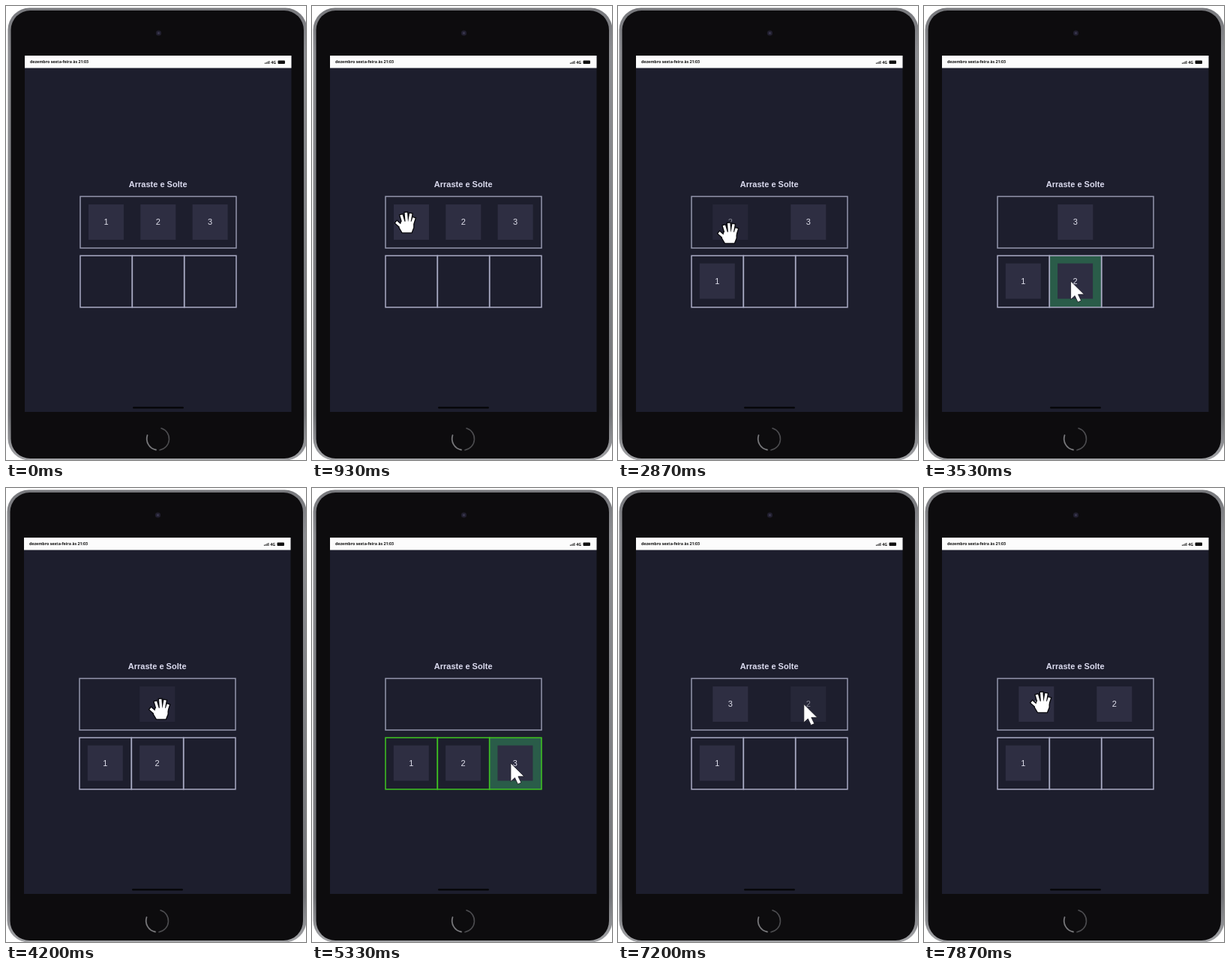
Recreate the animation shown at these times as an HTML page. Size 400 by 604 pixels, loop 8000 ms.

```html
<!DOCTYPE html>
<html lang="pt">
<head>
<meta charset="utf-8">
<title>Arraste e Solte</title>
<style>
  html, body { margin: 0; width: 100%; height: 100%; overflow: hidden; background: #fff; }
  svg { display: block; width: 400px; height: 604px; }
  text { font-family: "Liberation Sans", Arial, sans-serif; }
  .status { font: 700 5.3px "Open Sans", sans-serif; fill: #111; }
  .title { font-size: 11px; font-weight: 700; fill: #dcdcf0; text-anchor: middle; }
  .label { font-size: 11px; fill: #dedeea; text-anchor: middle; }
  .box { fill: none; stroke-width: 1.5; stroke: #9496ad; }
</style>
</head>
<body>
<svg viewBox="0 0 400 604">
  <defs>
    <linearGradient id="rim" x1="0" y1="0" x2="0" y2="1">
      <stop offset="0" stop-color="#77787c"/>
      <stop offset=".1" stop-color="#8c8d91"/>
      <stop offset=".9" stop-color="#737478"/>
      <stop offset="1" stop-color="#a2a3a6"/>
    </linearGradient>
    <g id="handShape">
      <path d="M-5-8L-2 2M1-11L2 2M7-9.5L5 2M11-4L8 5M-11 1L-3 8" fill="none" stroke-linecap="square"/>
      <path d="M-4 1H9V7L7 12H-3L-6 7Z"/>
    </g>
  </defs>
  <g id="stage">
    <rect x="1.5" y="2.5" width="399" height="602" rx="29" fill="url(#rim)"/>
    <rect x="5.5" y="6" width="390.5" height="596" rx="26" fill="#0d0c0e"/>
    <circle cx="202.5" cy="36" r="3.6" fill="#211f2e"/>
    <circle cx="202.5" cy="36" r="1.6" fill="#3a3850"/>
    <rect x="24" y="66" width="355.5" height="474" fill="#1d1e2d"/>
    <rect x="24" y="66" width="355.5" height="16.5" fill="#fcfcfc"/>
    <text class="status" x="31" y="76.4">dezembro sexta-feira às 21:03</text>
    <path d="M344.5 77v-1.5M346.3 77v-2.3M348.1 77v-3.2M349.9 77v-4" stroke="#333" stroke-width="1.1"/>
    <text class="status" x="352.3" y="76.6">4G</text>
    <rect x="361.5" y="72.5" width="9.5" height="4.4" rx="1" fill="#111"/>
    <rect x="168" y="533.3" width="68" height="2.2" rx="1.1" fill="#050507"/>
    <g fill="none" stroke-linecap="round">
      <path d="M187.5 571A15 15 0 0 0 199 590.5" stroke="#77777a" stroke-width="1.8"/>
      <path d="M206 561.7A15 15 0 0 1 204 590.8" stroke="#4c4c4f" stroke-width="1.6"/>
    </g>
    <text class="title" x="201.7" y="241.2">Arraste e Solte</text>
    <rect class="box" x="98" y="253.4" width="208" height="68.6"/>
    <g id="slots"></g>
    <g id="tiles"></g>
    <path id="arrow" d="M0 0V24.5L5.5 19.5L9.5 28L14 26L10 17.8H18Z" fill="#fff" stroke="#15151f" stroke-width=".8"/>
    <g id="hand">
      <use href="#handShape" fill="#08080c" stroke="#08080c" stroke-width="6"/>
      <use href="#handShape" fill="#fff" stroke="#fff" stroke-width="3.4"/>
    </g>
  </g>
</svg>
<script>
const LOOP = 8000, FPS = 15;
const MID = 202, WIDTH = 208, TOP = 287.5, LOW = 366;
const FADE = 130, DIM = .55;
const NONE = -1;

// The cursor goes to a tile from leave to arrive, grips it at an offset from
// its centre and drops it in a slot, or back on top; over is the lit slot.
const drags = [
  { tile: 0, slot: 0, over: 0, leave: 670, arrive: 930, grab: 1470, drop: 2000, grip: [-8, 0] },
  { tile: 1, slot: 1, over: 1, leave: 2470, arrive: 2870, grab: 2730, drop: 3400, grip: [-3, 14] },
  { tile: 2, slot: 2, over: 2, leave: 3670, arrive: 4200, grab: 4070, drop: 5000, grip: [3, 6] },
  { tile: 2, slot: NONE, over: 1, leave: 5530, arrive: 5670, grab: 5530, drop: 5930, grip: [0, 2] },
  { tile: 1, slot: NONE, over: NONE, leave: 6070, arrive: 6600, grab: 6800, drop: 7200, grip: [14, 3] },
  { tile: 2, leave: 7670, arrive: 7870, grab: LOOP, drop: LOOP, grip: [6, -3] }
];

const $ = id => document.getElementById(id);
const clamp = v => Math.min(1, Math.max(0, v));
const place = (el, x, y) => el.setAttribute("transform", `translate(${x} ${y})`);
const show = (el, on) => { el.style.display = on ? "" : "none"; };

// Centre of place i of n, spread evenly over the box.
const spread = (i, n) => MID + (i - (n - 1) / 2) * WIDTH / n;

function add(parent, tag, attrs, text) {
  const el = document.createElementNS("http://www.w3.org/2000/svg", tag);
  for (const k in attrs) el.setAttribute(k, attrs[k]);
  if (text) el.textContent = text;
  return parent.appendChild(el);
}

const slots = [0, 1, 2].map(i => {
  const size = { x: 98 + i * WIDTH / 3, y: 332.2, width: WIDTH / 3, height: 68.6 };
  return {
    fill: add($("slots"), "rect", { ...size, fill: "#2a5c49" }),
    edge: add($("slots"), "rect", { ...size, class: "box" })
  };
});

const tiles = [1, 2, 3].map(n => {
  const g = add($("tiles"), "g", {});
  add(g, "rect", { x: -23.5, y: -23.5, width: 47, height: 47, fill: "#2e2e42" });
  add(g, "text", { class: "label", y: 3.8 }, n);
  return g;
});

// Where every tile lies after the drops made so far.
function layout(done) {
  const spots = [];
  let top = [0, 1, 2];
  for (const { tile, slot } of done) {
    top = top.filter(n => n !== tile);
    if (slot === NONE) top.push(tile);
    else spots[tile] = [spread(slot, 3) - .4, LOW];
  }
  top.forEach((tile, i) => { spots[tile] = [spread(i, top.length) - .2, TOP]; });
  return { spots, full: !top.length };
}

function render(ms) {
  const t = Math.floor((ms + 4) * FPS / 1000) * 1000 / FPS + 4;
  place($("stage"), t < 70 ? 1 : clamp((330 - t) / 330), 0);

  const done = drags.filter(d => d.drop <= t);
  const last = done.at(-1), now = drags[done.length];
  const { spots, full } = layout(done);
  const way = clamp((t - now.leave) / (now.arrive - now.leave));
  const since = last ? t - last.drop : 0;

  tiles.forEach((g, i) => {
    let dim = 0;
    if (last && last.tile === i) dim = 1 - clamp(since / FADE);
    if (now.tile === i) dim = Math.max(dim, clamp((t - now.grab) / FADE));
    place(g, ...spots[i]);
    g.setAttribute("opacity", 1 - (1 - DIM) * dim);
  });

  slots.forEach((s, i) => {
    const lit = last && last.over === i;
    s.fill.setAttribute("opacity", lit ? clamp(.5 + since / 260) * (1 - way) : 0);
    s.edge.style.stroke = full ? "#3fc522" : "#a9abc4";
  });

  const from = last ? [spots[last.tile][0] - 6, spots[last.tile][1]] : [228, 398];
  const at = from.map((v, k) => v + (spots[now.tile][k] + now.grip[k] - v) * way);
  const shown = last || t >= now.leave, hand = way > .8;
  place($("hand"), ...at);
  place($("arrow"), ...at);
  show($("hand"), shown && hand);
  show($("arrow"), shown && !hand);
}

const start = performance.now();
function tick() {
  render((performance.now() - start) % LOOP);
  requestAnimationFrame(tick);
}
tick();
</script>
</body>
</html>
```
